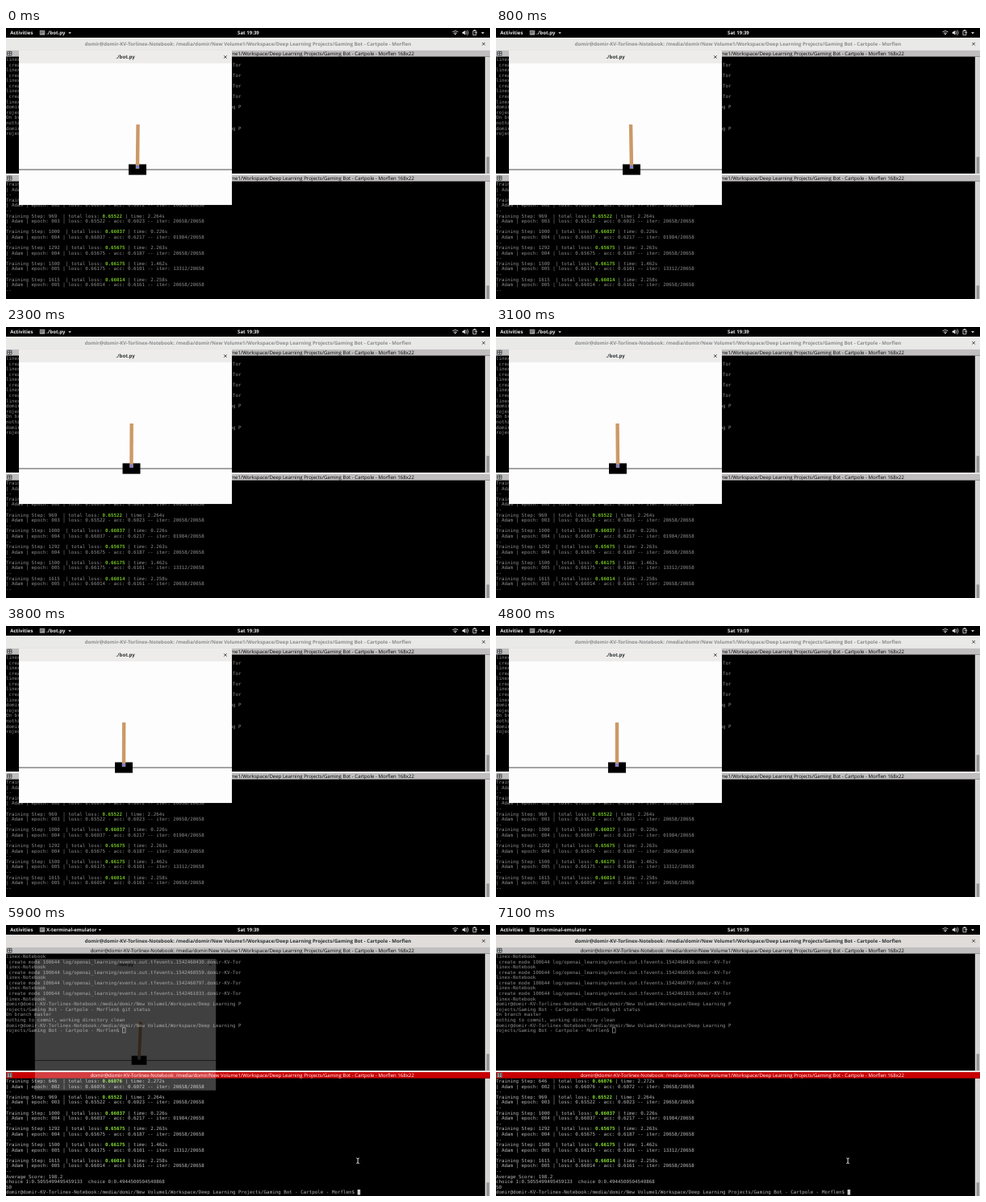
An HTML page that plays this animation: 600 px wide and 337 px high, repeating every 7200 ms.

```html
<!DOCTYPE html>
<html lang="en">
<head>
<meta charset="utf-8">
<title>Cartpole bot</title>
<style>
html, body { margin: 0; width: 100%; height: 100%; overflow: hidden; background: #000; }
svg { display: block; width: 100vw; height: 100vh; }
text { white-space: pre; text-rendering: geometricPrecision; }
.ui { font: 13.8px "Open Sans", "Noto Sans", sans-serif; }
.bold { font-weight: 700; }
.mono { font: 13.29px "DejaVu Sans Mono", monospace; fill: #8e8e8e; }
.mono .loss { font-weight: 700; fill: #74c022; }
.mid { text-anchor: middle; }
.line { fill: none; stroke: #2e3436; stroke-width: 2; }
#mainBar { fill: #e9e9e7; }
#mainTitle { fill: #8b8e8f; }
.pane { fill: #c0bebf; }
.paneText { fill: #000; }
.live #mainBar { fill: #dfdcd9; }
.live #mainTitle { fill: #2e3436; }
.live #lowBar { fill: #c80003; }
.live #lowTitle { fill: #fff; }
.live #low { fill: #b8b8b8; }
.live #low .loss { fill: #8ae234; }
.liveOnly, .live .idleOnly { display: none; }
.live .liveOnly { display: inline; }
</style>
</head>
<body>
<svg id="stage" viewBox="0 0 1366 767.2" preserveAspectRatio="none"></svg>
<script>
const stage = document.getElementById("stage");
const LOOP = 7200, STEP = 100, PRINT = 5600, CLOSE = 5800, CLOSE_TIME = 200;
const ROW = 15, UPPER = 88.5, LOWER = 441.7;

const rect = (x, y, w, h, attrs) => `<rect x="${x}" y="${y}" width="${w}" height="${h}" ${attrs}/>`;
const text = (x, y, s, attrs) => `<text x="${x}" y="${y}" dy=".35em" ${attrs}>${s}</text>`;
const rows = (lines, top) => lines.map((s, i) => text(0, top + i * ROW, s, "")).join("");
const cross = (x, y) => `<path class="line" d="M${x - 4} ${y - 4}l8 8m0-8l-8 8"/>`;

const user = "domir", host = "domir-KV-Torlinex-Notebook";
const path = `/media/${user}/New Volume1/Workspace/Deep Learning Projects/Gaming Bot - Cartpole - Morflen`;
const title = `${user}@${host}: ${path}`;
const prompt = `${user}@${host}:${path}$ `;
const wrapped = [prompt.slice(0, 83), prompt.slice(83)];

const upperLines = ["linex-Notebook"];
for (const stamp of [1542460430, 1542460559, 1542460797, 1542461033])
  upperLines.push(` create mode 100644 log/openai_learning/events.out.tfevents.${stamp}.${host.slice(0, 12)}`, "linex-Notebook");
upperLines.push(wrapped[0], wrapped[1] + "git status", "On branch master",
  "nothing to commit, working directory clean", ...wrapped);

// step, epoch, loss, accuracy, seconds, iteration
const training = [
  [500, 2, "0.66518", "0.6049", "1.034", "11392"],
  [646, 2, "0.66076", "0.6072", "2.272", "20658"],
  [969, 3, "0.65522", "0.6023", "2.264", "20658"],
  [1000, 4, "0.66037", "0.6217", "0.226", "01984"],
  [1292, 4, "0.65675", "0.6187", "2.263", "20658"],
  [1500, 5, "0.66175", "0.6101", "1.462", "13312"],
  [1615, 5, "0.66014", "0.6161", "2.258", "20658"],
];
const lowerLines = training.flatMap(([step, epoch, loss, acc, secs, iter]) => [
  `Training Step: ${step}  | total loss: <tspan class="loss">${loss}</tspan> | time: ${secs}s`,
  `| Adam | epoch: 00${epoch} | loss: ${loss} - acc: ${acc} -- iter: ${iter}/20658`,
  "--",
]);
const results = ["Average Score: 198.2",
  "choice 1:0.5055499495459133  choice 0:0.4944500504540868", "50"];

const paneBar = (y, bar, label) =>
  rect(0, y, 1366, 17.5, `class="pane" id="${bar}"`) +
  rect(3, y + 2, 14, 13, 'fill="#ddd"') +
  `<path class="line" stroke-width="1.5" d="M4 ${y + 3}h12v11h-12zM10 ${y + 3}v11M4 ${y + 8}h12"/>` +
  text(695, y + 8, title + " 168x22", `class="ui paneText mid" id="${label}"`);

const scrollbar = (y, h, slider) =>
  rect(1352, y, 14, h, 'fill="#d6d4d2"') + rect(1356, y + h - slider, 8, slider, 'fill="#959595"');

const appLabel = (name, arrow, cls) => `<g class="${cls}">
  ${text(114, 13.5, name, 'class="ui bold" fill="#e6e6e6"')}
  <path fill="#ddd" d="M${arrow - 4} 12h8l-4 5z"/></g>`;

const topBar = rect(0, 0, 1366, 27, "") +
  text(12, 13.5, "Activities", 'class="ui bold" fill="#e6e6e6"') +
  rect(95, 7, 15, 13, 'rx="1" fill="#999"') +
  '<path d="M97 11h11m-11 3h6" fill="none" stroke="#333" stroke-width="1.5"/>' +
  appLabel("./bot.py", 180, "idleOnly") + appLabel("X-terminal-emulator", 265, "liveOnly") +
  text(684, 13.5, "Sat 19:39", 'class="ui bold mid" fill="#e6e6e6"') +
  `<g fill="#e6e6e6"><path d="M1265 16h6l-3 4z"/><path d="M1288 11h3l5-4v13l-5-4h-3z"/>
   <path d="M1260 11q8-6 16 0m-13 4q5-4 10 0M1298 9q4 4 0 9m3-12q7 7 0 15M1318 8h9v12h-9zm2-2h5m-3 7h8"
     fill="none" stroke="#e6e6e6" stroke-width="1.8"/>
   <path d="M1341 12h9l-4.500 5z"/></g>`;

const botWindow = `<g id="bot">
  ${rect(36.5, 64, 601, 437, 'fill="#fdfdfe"')}
  ${rect(36.5, 64, 601, 36, 'fill="#eeecea"')}
  ${text(337, 82, "./bot.py", 'class="ui bold mid" fill="#2e3436"')}
  ${cross(619, 82)}
  <g id="cart">
    ${rect(-25, -15, 50, 30, "")}
    <g id="pole">${rect(-5, -120, 10, 125, 'fill="#cc9966"')}</g>
    <circle cy="-7.500" r="5" fill="#8080cc"/>
  </g>
  ${rect(36.5, 400, 601, 1.6, "")}
</g>`;

stage.innerHTML = rect(0, 0, 1366, 768, "") +
  `<g id="low" class="mono"><g id="log">${rows(lowerLines, LOWER)}
    <g id="results">${rows(results, LOWER + 21 * ROW)}</g></g>
    <g class="liveOnly">${text(0, LOWER + 21 * ROW, prompt, "")}${rect(992, 749, 8, 15, 'fill="#ccc"')}</g></g>` +
  rect(0, 81, 1366, 331, "") +
  `<g class="mono">${rows(upperLines, UPPER)}</g>` +
  rect(329, 291, 8, 14, 'fill="none" stroke="#aaa" stroke-width="1.5"') +
  scrollbar(81, 331, 47) + scrollbar(434, 333.2, 38) +
  rect(0, 27, 1366, 37, 'id="mainBar"') +
  text(683, 45, title, 'class="ui bold mid" id="mainTitle"') + cross(1348, 45) +
  rect(0, 412, 1366, 5, 'fill="#e8e8e7"') +
  paneBar(63.5, "upBar", "upTitle") + paneBar(416.5, "lowBar", "lowTitle") +
  topBar + botWindow +
  '<path class="liveOnly" d="M989 660q4 0 4 3v9q0 3-4 3m8-15q-4 0-4 3m0 9q0 3 4 3" fill="none" stroke="#fff" stroke-width="2"/>';

const [low, log, output, bot, cart, pole] =
  ["low", "log", "results", "bot", "cart", "pole"].map(id => document.getElementById(id));

// time, cart centre in 600 px units, pole angle in degrees
const poses = [
  [0, 163, 0.6], [400, 171, 1], [800, 168, -1], [1300, 134, -1], [1500, 146, 0],
  [2300, 155.5, 0.2], [3100, 151, -0.5], [3800, 146, 0.2], [4400, 137, 0.5],
  [4800, 150, 0], [5700, 168, 2.5], [LOOP, 168, 2.5],
];

function poseAt(t) {
  const i = poses.findIndex(p => p[0] > t);
  const [a, b] = [poses[i - 1], poses[i]];
  const u = (1 - Math.cos(Math.PI * (t - a[0]) / (b[0] - a[0]))) / 2;
  return [1, 2].map(k => a[k] + (b[k] - a[k]) * u);
}

function draw(now) {
  const t = Math.floor(now % LOOP / STEP) * STEP;
  const [x, angle] = poseAt(t);
  cart.setAttribute("transform", `translate(${x * 1366 / 600} 400.8)`);
  pole.setAttribute("transform", `translate(0 -7.5) rotate(${angle})`);

  const printed = t >= PRINT;
  log.setAttribute("transform", `translate(0 ${printed ? -3 * ROW : 0})`);
  output.style.display = printed ? "" : "none";
  stage.classList.toggle("live", t >= CLOSE);

  const u = Math.min(1, Math.max(0, (t - CLOSE) / CLOSE_TIME));
  const closed = 1 - (1 - u) ** 2;
  bot.setAttribute("opacity", 1 - closed);
  bot.setAttribute("transform", `translate(337 282.5) scale(${1 - 0.2 * closed}) translate(-337 -282.5)`);
  requestAnimationFrame(draw);
}
draw(performance.now());
</script>
</body>
</html>
```
